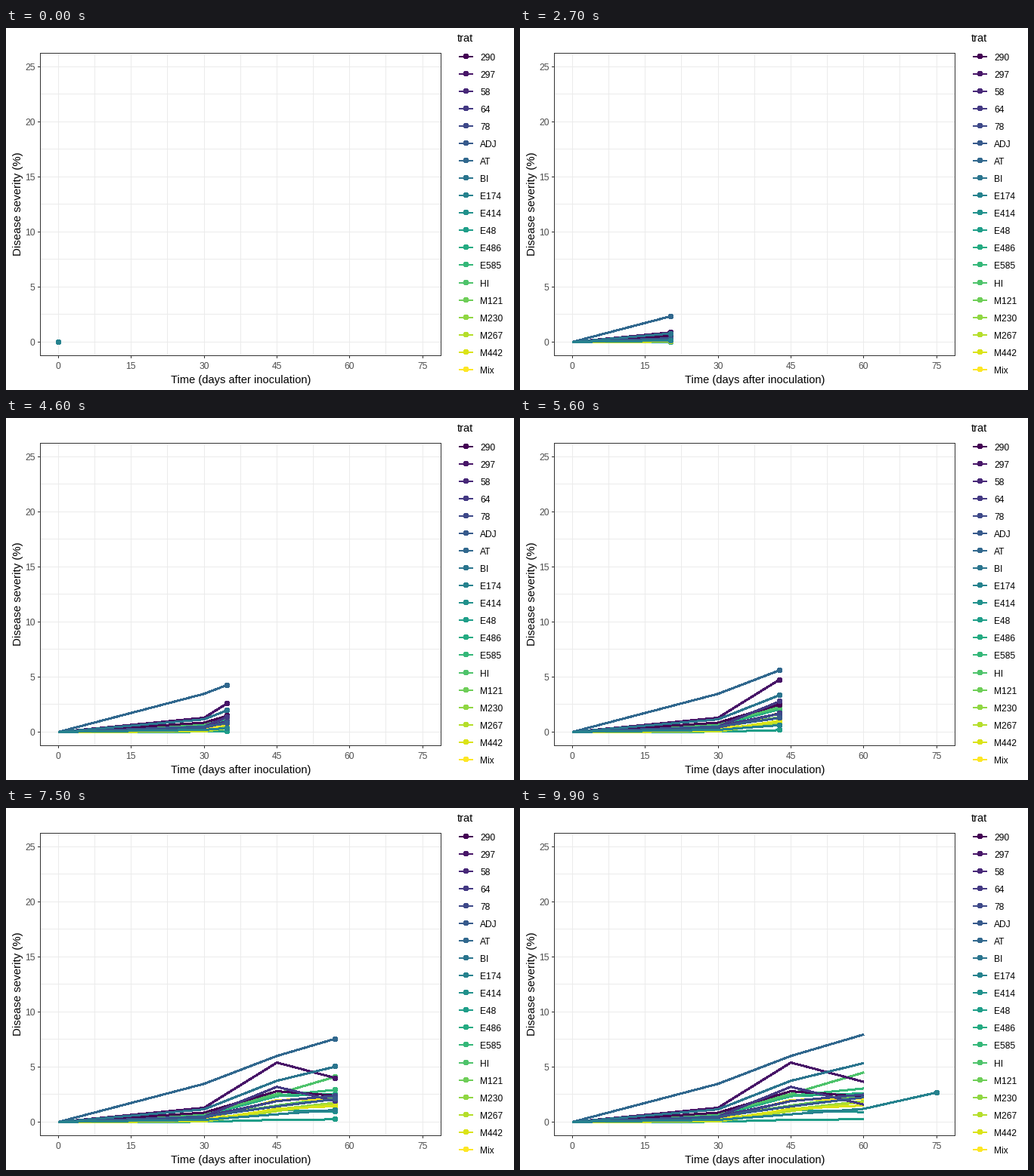
Write a matplotlib script that moves like this. It is 672x480 px and loops after 10 s.

```python
import numpy as np
import matplotlib.pyplot as plt
from matplotlib.animation import FuncAnimation
from matplotlib.patches import Circle, Rectangle

W, H, DPI = 672, 480, 96
FRAMES, INTERVAL = 100, 100
PX = 72 / DPI
plt.rcParams["font.family"] = "Liberation Sans"

DAYS = [0, 30, 45, 60, 75]
KEYS = [0, 40, 59, 79, 99]  # frame at which each day is reached

# severity at days 30, 45, 60 and 75
SEVERITY = {
    "290": (0.85, 2.8, 2.3, 3.2),
    "297": (1.3, 5.4, 3.65, 4.4),
    "58": (0.5, 1.9, 2.5, 5.3),
    "64": (0.5, 3.2, 1.58, 1.75),
    "78": (0.4, 1.9, 2.5, 3.0),
    "ADJ": (0.5, 1.42, 2.25, 3.4),
    "AT": (3.47, 6.0, 7.95, 11.45),
    "BI": (1.15, 3.75, 5.35, 7.1),
    "E174": (0.2, 0.7, 1.2, 2.68),
    "E414": (0.2, 1.1, 0.9, 0.95),
    "E48": (0.03, 0.2, 0.25, 1.5),
    "E486": (0.6, 2.35, 2.6, 2.6),
    "E585": (0.8, 2.4, 3.05, 2.8),
    "HI": (0.75, 2.55, 4.5, 8.5),
    "M121": (0.5, 1.5, 2.4, 3.5),
    "M230": (0.2, 1.15, 1.9, 3.0),
    "M267": (0.05, 1.0, 1.85, 3.0),
    "M442": (0.12, 1.2, 1.5, 4.0),
    "Mix": (0.2, 2.0, 2.1, 2.2),
}
NAMES = list(SEVERITY)
COLORS = dict(zip(NAMES, plt.cm.viridis(np.linspace(0, 1, len(NAMES)))))
LAST = "E174"
ORDER = NAMES[9:] + NAMES[:9]  # back to front


def sx(day):
    return 69.3 + np.asarray(day) * 6.424


def sy(value):
    return 416.4 - np.asarray(value) * 14.6


def pixel(v):
    return np.floor(v) + 0.5


fig = plt.figure(figsize=(W / DPI, H / DPI), dpi=DPI, facecolor="white")
ax = fig.add_axes([0, 0, 1, 1])
ax.set_xlim(0, W)
ax.set_ylim(H, 0)
ax.axis("off")


def rule(xs, ys, color, width=1, z=1):
    return ax.plot(xs, ys, color=color, lw=width * PX, zorder=z, snap=False,
                   antialiased=False, solid_capstyle="butt")[0]


def dot(x, y, color):
    return ax.add_patch(Circle((pixel(x), pixel(y)), 3.4, fc=color, lw=0,
                               antialiased=False, zorder=4))


def label(x, y, text, px=12, color="black", **kw):
    ax.text(x, y, text, fontsize=px * PX, color=color, va="baseline", **kw)


def draw_axes():
    for day in np.arange(0, 76, 7.5):
        x = pixel(sx(day))
        rule([x, x], [33, 434], "#EBEBEB")
        if day % 15 == 0:
            rule([x, x], [435, 438], "#333333")
            label(x - 0.5, 452, f"{day:g}", color="#4D4D4D", ha="center")
    for value in np.arange(0, 26, 2.5):
        y = pixel(sy(value))
        rule([45, 575], [y, y], "#EBEBEB")
        if value % 5 == 0:
            rule([42, 45], [y, y], "#333333")
            label(38.5, y + 4.5, f"{value:g}", color="#4D4D4D", ha="right")
    ax.add_patch(Rectangle((45.5, 33.5), 530, 401, fill=False, ec="#333333",
                           lw=PX, snap=False, antialiased=False, zorder=6))
    label(310.5, 471, "Time (days after inoculation)", 14.67, ha="center")
    label(20, 233, "Disease severity (%)", 15, ha="center",
          rotation=90, rotation_mode="anchor")


def draw_legend():
    label(596.5, 18, "trat", 14.67)
    for i, name in enumerate(NAMES):
        y = np.floor(37.5 + 23.04 * i)
        rule([599, 618], [y + 1, y + 1], COLORS[name], 2)
        dot(608, y, COLORS[name])
        label(627, y + 6, name)


draw_axes()
draw_legend()
lines = {n: rule([], [], COLORS[n], 2, 3) for n in ORDER}
dots = {n: dot(sx(0), sy(0), COLORS[n]) for n in ORDER}


def update(i):
    now = np.interp(i, KEYS, DAYS)
    for name in ORDER:
        values = (0,) + SEVERITY[name]
        # only one treatment keeps its final observation
        ended = i == FRAMES - 1 and name != LAST
        end = 60 if ended else now
        days = [d for d in DAYS if d < end] + [end]
        ys = sy(np.interp(days, DAYS, values))
        lines[name].set_data(sx(days), ys)
        dots[name].center = pixel(sx(end)), pixel(ys[-1])
        dots[name].set_visible(not ended)
    return [*lines.values(), *dots.values()]


anim = FuncAnimation(fig, update, frames=FRAMES, interval=INTERVAL,
                     repeat=True, repeat_delay=0, blit=False)
plt.show()
```
